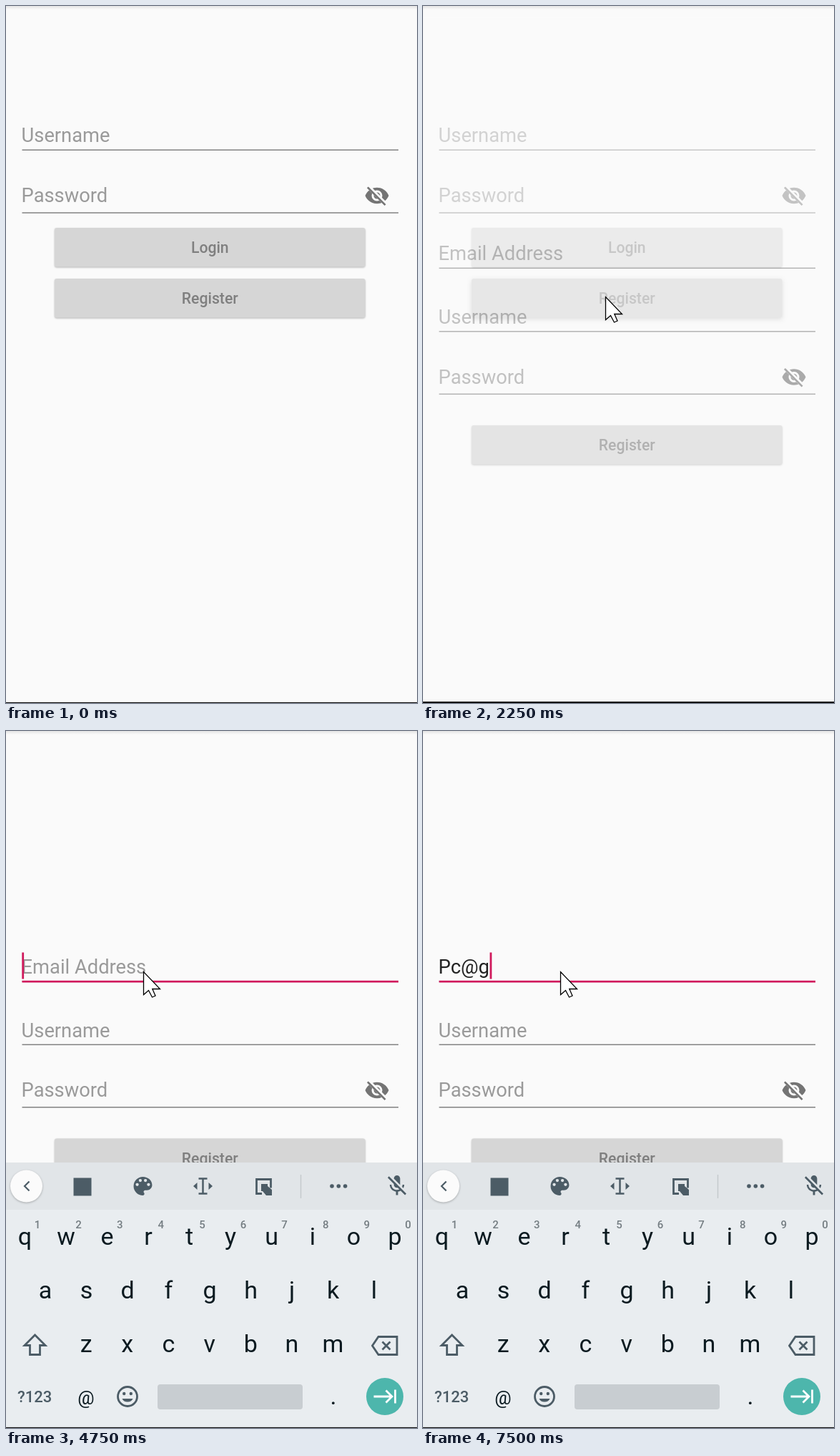
Animation, 575 px wide and 974 px high, one loop 8 s. Source, as an HTML page:

```html
<!DOCTYPE html>
<html lang="en">
<head>
<meta charset="utf-8">
<title>Registration form</title>
<style>
html, body { margin: 0; width: 100%; height: 100%; overflow: hidden; background: #fafafa; }
svg { display: block; width: 575px; height: 974px; font-family: Roboto, sans-serif; }
.hint { font-size: 27.3px; fill: #9a9a9a; }
.typed { font-size: 27.3px; fill: #222; }
.rule { fill: #828282; }
.accent { fill: #d0195c; }
.button { fill: #d6d6d6; filter: drop-shadow(0 1.5px 1.2px #0004); }
.label { font-size: 21.2px; font-weight: 500; fill: #7f7f7f; text-anchor: middle; }
.key { font-size: 34px; fill: #0b1a20; text-anchor: middle; }
.digit { font-size: 15px; font-weight: 500; fill: #747d82; text-anchor: middle; }
.solid { fill: #4c5c66; }
.line { fill: none; stroke: #4c5c66; stroke-width: 2.8; }
</style>
</head>
<body>
<svg viewBox="0 0 575 974">
  <defs>
    <linearGradient id="topShade" x2="0" y2="1">
      <stop stop-color="#e4e4e4"/><stop offset="1" stop-color="#fafafa"/>
    </linearGradient>
    <g id="eye">
      <path fill="#747474" fill-rule="evenodd" d="M12 4.5C7 4.5 2.73 7.61 1 12c1.73 4.39 6 7.5 11 7.5s9.27-3.11 11-7.5c-1.73-4.39-6-7.5-11-7.5zM12 17a5 5 0 1 1 0-10 5 5 0 0 1 0 10zM12 9a3 3 0 1 0 0 6 3 3 0 0 0 0-6z"/>
      <path stroke="#fafafa" stroke-width="3.6" d="M3.27 3 21 20.73"/>
      <path stroke="#747474" stroke-width="1.8" d="M3.27 4.27 19.74 20.74"/>
    </g>
  </defs>
  <rect width="575" height="974" fill="#fafafa"/>
  <g id="login"></g>
  <g id="register">
    <rect width="575" height="974" fill="#fafafa"/>
    <g id="form"></g>
    <rect id="focusRule" class="accent" x="22.5" y="348.8" width="526.5" height="2.7"/>
    <text id="typed" class="typed" x="21.6" y="338.5"></text>
    <rect id="composing" x="22.5" y="340.4" height="1.4" fill="#333"/>
    <rect id="caret" class="accent" y="309.5" width="2.8" height="37"/>
  </g>
  <rect width="575" height="5" fill="url(#topShade)"/>

  <g id="keyboard">
    <rect y="603" width="575" height="371" fill="#e9edf0"/>
    <rect y="603" width="575" height="66" fill="#e1e5e8"/>
    <circle cx="28.5" cy="636" r="22.5" fill="#fbfbfb" style="filter:drop-shadow(0 1px 1.5px #0004)"/>
    <path id="chevron" class="line" style="stroke-width:2.2"/>
    <g id="tools">
      <rect class="solid" x="94.5" y="624.5" width="25" height="25"/>
      <g transform="translate(174.2 618.7) scale(1.44)">
        <path class="solid" d="M12 3a9 9 0 0 0 0 18c.83 0 1.5-.67 1.5-1.5 0-.39-.15-.74-.39-1.01-.23-.26-.38-.61-.38-.99 0-.83.67-1.5 1.5-1.5H16c2.76 0 5-2.24 5-5 0-4.42-4.03-8-9-8z"/>
        <g fill="#e1e5e8"><circle cx="6.5" cy="10.5" r="1.5"/><circle cx="9.5" cy="6.5" r="1.5"/><circle cx="14.5" cy="6.5" r="1.5"/><circle cx="17.5" cy="10.5" r="1.5"/></g>
      </g>
      <path class="line" style="stroke-width:2.5" d="M269.5 625.5h12M269.5 646.5h12M275.5 625.5v21"/>
      <path class="solid" d="M267.5 631v10l-5.5-5zM283.5 631v10l5.5-5z"/>
      <path class="line" d="M358 646.5h-7.500v-20h20v12"/>
      <path class="solid" d="M357 633h9v3l6 5v8h-8l-5-6h-2z"/>
      <path stroke="#c5cacd" stroke-width="1.5" d="M412.500 620v33"/>
      <g class="solid"><circle cx="456" cy="636" r="2.8"/><circle cx="465.300" cy="636" r="2.8"/><circle cx="474.600" cy="636" r="2.8"/></g>
    </g>
    <text id="suggestion" x="284" y="647" text-anchor="middle" font-size="27.5" fill="#596770"></text>
    <path class="solid" transform="translate(529.6 618) scale(1.45)" d="M19 11h-1.7c0 .74-.16 1.43-.43 2.05l1.23 1.23c.56-.98.9-2.09.9-3.28zm-4.02.17c0-.06.02-.11.02-.17V5c0-1.66-1.34-3-3-3S9 3.34 9 5v.18l5.98 5.99zM4.27 3L3 4.27l6.01 6.01V11c0 1.66 1.33 3 2.99 3 .22 0 .44-.03.65-.08l1.66 1.66c-.71.33-1.5.52-2.31.52-2.76 0-5.3-2.1-5.3-5.1H5c0 3.41 2.72 6.23 6 6.72V21h2v-3.28c.91-.13 1.77-.45 2.54-.9L19.73 21 21 19.73 4.27 3z"/>
    <g id="keys"></g>
    <path class="line" d="M40.500 844 26 858.500h7.500v13h14v-13H55z"/>
    <path class="line" d="M521 846.500h26v25h-26l-8.500-12.500zM526.500 853.500l11 11M537.500 853.500l-11 11"/>
    <text x="16" y="938" font-size="22" font-weight="500" class="solid">?123</text>
    <text x="112" y="941" class="key" style="font-size:26px">@</text>
    <circle class="line" cx="170" cy="930" r="13.5"/>
    <g class="solid"><circle cx="165.200" cy="926" r="2.200"/><circle cx="174.800" cy="926" r="2.200"/><path d="M162.500 933h15a8 7 0 0 1-15 0z"/></g>
    <rect x="212" y="913" width="203" height="35" rx="4" fill="#c8cdd1"/>
    <text x="458" y="941" class="key">.</text>
    <circle cx="530" cy="930" r="26" fill="#4db6ac"/>
    <path fill="none" stroke="#fff" stroke-width="2.8" d="M514.500 930h25M531.500 921.500l8.500 8.500-8.500 8.500M544.500 920.500v19"/>
  </g>

  <rect id="bottomEdge" width="575" height="2" fill="#111"/>
  <path id="pointer" d="M0 0V32L7 26 12 35.500 16.500 33.500 12.300 24H23Z" fill="#fff" stroke="#000" stroke-width="1.3"/>
</svg>
<script>
const LOOP = 8000, STEP = 250;
const el = Object.fromEntries([...document.querySelectorAll('[id]')].map(e => [e.id, e]));

const field = (name, baseline, ruleY) =>
  `<text class="hint" id="hint${name[0]}${ruleY}" x="21.6" y="${baseline}">${name}</text>
   <rect class="rule" x="22.5" y="${ruleY - .75}" width="526.5" height="1.5"/>`;
const button = (name, y) =>
  `<rect class="button" x="68" y="${y}" width="434.5" height="54.500" rx="3"/>
   <text class="label" x="285.3" y="${y + 35}">${name}</text>`;
const eye = y => `<use href="#eye" transform="translate(501 ${y - 18}) scale(1.5)"/>`;

el.login.innerHTML = field('Username', 190, 201.2) + field('Password', 274, 289) + eye(265)
  + button('Login', 310) + button('Register', 381);
el.form.innerHTML = field('Email Address', 338.5, 349.8) + field('Username', 427.5, 438.3)
  + field('Password', 511, 525.8) + eye(502) + button('Register', 569.5);

const keyRow = (letters, x, baseline) => [...letters].map((c, i) =>
  `<text class="key" x="${x + i * 57.5}" y="${baseline}">${c}</text>`).join('');
el.keys.innerHTML = keyRow('qwertyuiop', 26.5, 718) + keyRow('asdfghjkl', 55, 793) + keyRow('zxcvbnm', 112.3, 868)
  + [...'1234567890'].map((d, i) => `<text class="digit" x="${44 + i * 57.6}" y="695">${d}</text>`).join('');

const emailHint = el.form.querySelector('.hint');
const pressed = el.login.querySelectorAll('.button')[1];

// Each track is a list of [start time, value]; the value holds until the next entry.
const pointerTrack = [[0, null], [250, [284.5, 611.5]], [500, [266, 391]], [750, [264, 363.5]], [1000, [262.5, 379]],
  [1250, [256, 404]], [1500, [255.5, 406.5]], [3000, [248.5, 397.5]], [3250, [198.5, 343.5]], [3500, [192.5, 336.5]]];
const textTrack = [[0, ''], [5000, 'P'], [5500, 'Pc'], [7000, 'Pc@'], [7500, 'Pc@g']];
const suggestionTrack = [[0, ''], [5000, 'P'], [5750, 'Pc'], [7000, '']];
const caretTrack = [[0, false], [3750, true], [4500, false], [4750, true], [6000, false], [6500, true]];
const pressTrack = [[0, 0], [1750, .5], [2000, 1]];
const at = (track, t) => track.findLast(([start]) => start <= t)[1];
const show = (node, on) => node.setAttribute('display', on ? 'inline' : 'none');
const set = (node, name, value) => node.setAttribute(name, value);

function draw(t) {
  const press = at(pressTrack, t), tone = 214 - 10 * press;
  pressed.style.fill = `rgb(${tone},${tone},${tone})`;
  pressed.style.filter = `drop-shadow(0 ${1.5 + press}px ${1.2 + 2 * press}px #0004)`;

  const enter = Math.min(1, Math.max(0, (t - 2125) / 350));
  const eased = 1 - (1 - enter) ** 2;
  set(el.register, 'opacity', eased);
  set(el.register, 'transform', `translate(0 ${40 * (1 - eased)})`);
  set(el.bottomEdge, 'y', t >= 2250 && t < 2750 ? 972 : 972.9);

  const text = at(textTrack, t), suggestion = at(suggestionTrack, t);
  el.typed.textContent = text;
  const width = text ? el.typed.getComputedTextLength() : 0;
  show(emailHint, !text);
  show(el.focusRule, t >= 3750);
  show(el.composing, suggestion);
  set(el.composing, 'width', Math.max(0, width - .9));
  show(el.caret, at(caretTrack, t));
  set(el.caret, 'x', 22.300 + width);

  show(el.keyboard, t >= 4750);
  show(el.tools, !suggestion);
  el.suggestion.textContent = suggestion;
  set(el.chevron, 'd', suggestion ? 'M25 629.500l6.500 6.500-6.500 6.500' : 'M32.500 629.500l-6.500 6.500 6.500 6.500');

  const position = at(pointerTrack, t);
  show(el.pointer, position);
  if (position) set(el.pointer, 'transform', `translate(${position})`);
}

function tick(now) {
  draw(Math.floor(now % LOOP / STEP) * STEP);
  requestAnimationFrame(tick);
}
draw(0);
requestAnimationFrame(tick);
</script>
</body>
</html>
```
